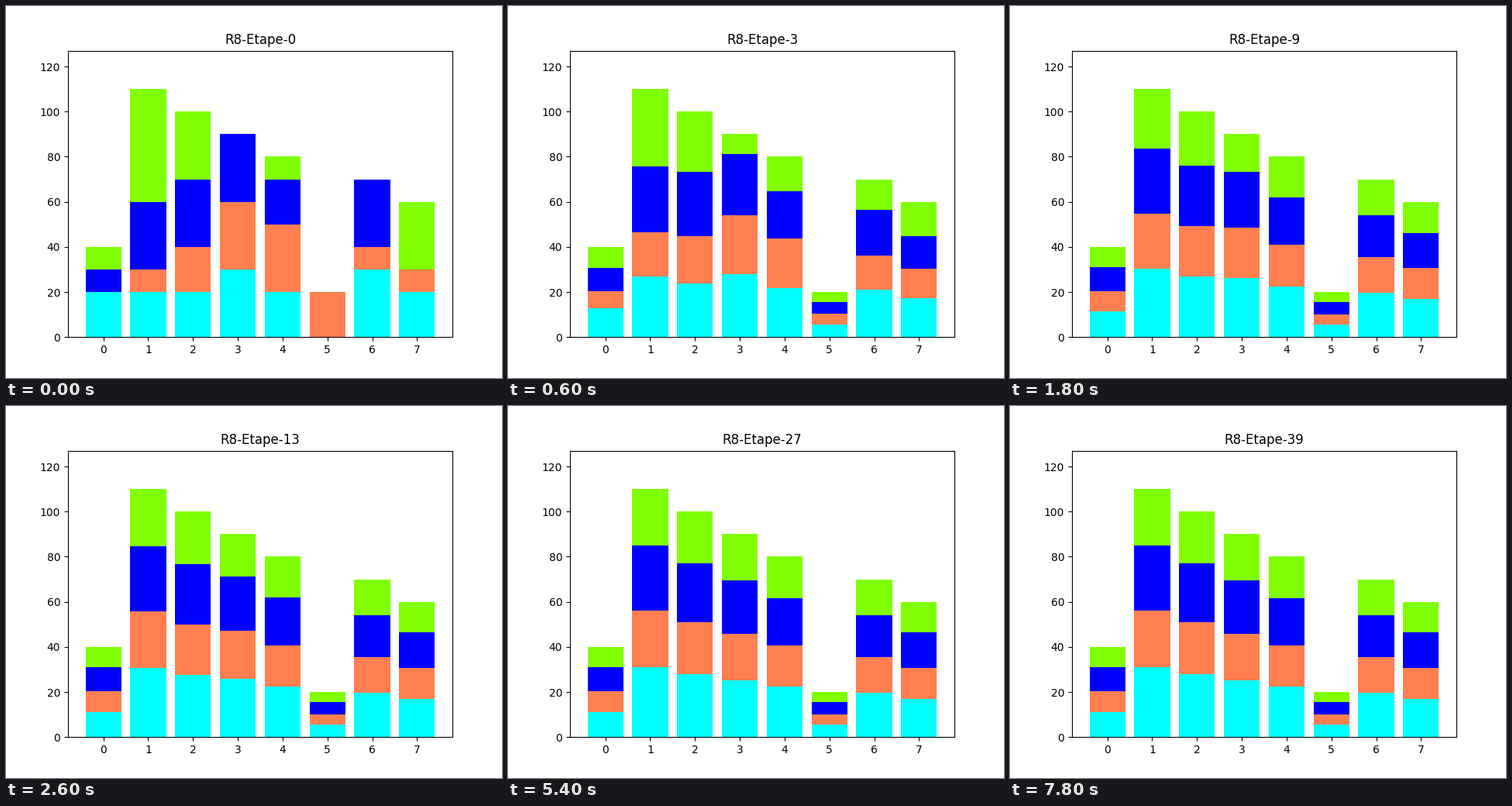
A matplotlib script that plays this animation: 640 by 480 pixels, repeating every 8 s.

```python
import numpy as np
import matplotlib.pyplot as plt
from matplotlib.animation import FuncAnimation

STEPS, INTERVAL = 40, 200
COLORS = ["cyan", "coral", "blue", "chartreuse"]

# Starting contents: one row per colour, one column per tank.
START = 10.0 * np.array([
    [2, 2, 2, 3, 2, 0, 3, 2],
    [0, 1, 2, 3, 3, 2, 1, 1],
    [1, 3, 3, 3, 2, 0, 3, 0],
    [1, 5, 3, 0, 1, 0, 0, 3],
])
# Share of the imbalance each tank keeps per step.
KEEP = np.array([0.55, 0.715, 0.82, 0.83, 0.7, 0.2, 0.52, 0.47])

TOTAL = START.sum(axis=0)
MIXED = np.outer(START.sum(axis=1) / TOTAL.sum(), TOTAL)


def contents(step):
    """Every tank relaxes at its own rate to the overall mix."""
    return MIXED + (START - MIXED) * KEEP ** step


fig, ax = plt.subplots(figsize=(6.4, 4.8), dpi=100)
tanks = np.arange(len(TOTAL))
layers = [ax.bar(tanks, TOTAL, color=color) for color in COLORS]
ax.set_xlim(-0.79, 7.79)
ax.set_ylim(0, 1.155 * TOTAL.max())
ax.set_xticks(tanks)
ax.set_yticks(range(0, 121, 20))
title = ax.set_title("")


def update(step):
    heights = contents(step)
    bottoms = heights.cumsum(axis=0) - heights
    for layer, base, height in zip(layers, bottoms, heights):
        for bar, y, h in zip(layer, base, height):
            bar.set_y(y)
            bar.set_height(h)
            bar.set_visible(h > 1e-6)
    title.set_text(f"R8-Etape-{step}")
    return [title]


anim = FuncAnimation(fig, update, frames=STEPS, interval=INTERVAL,
                     init_func=lambda: update(0), repeat=True, repeat_delay=0)
plt.show()
```
